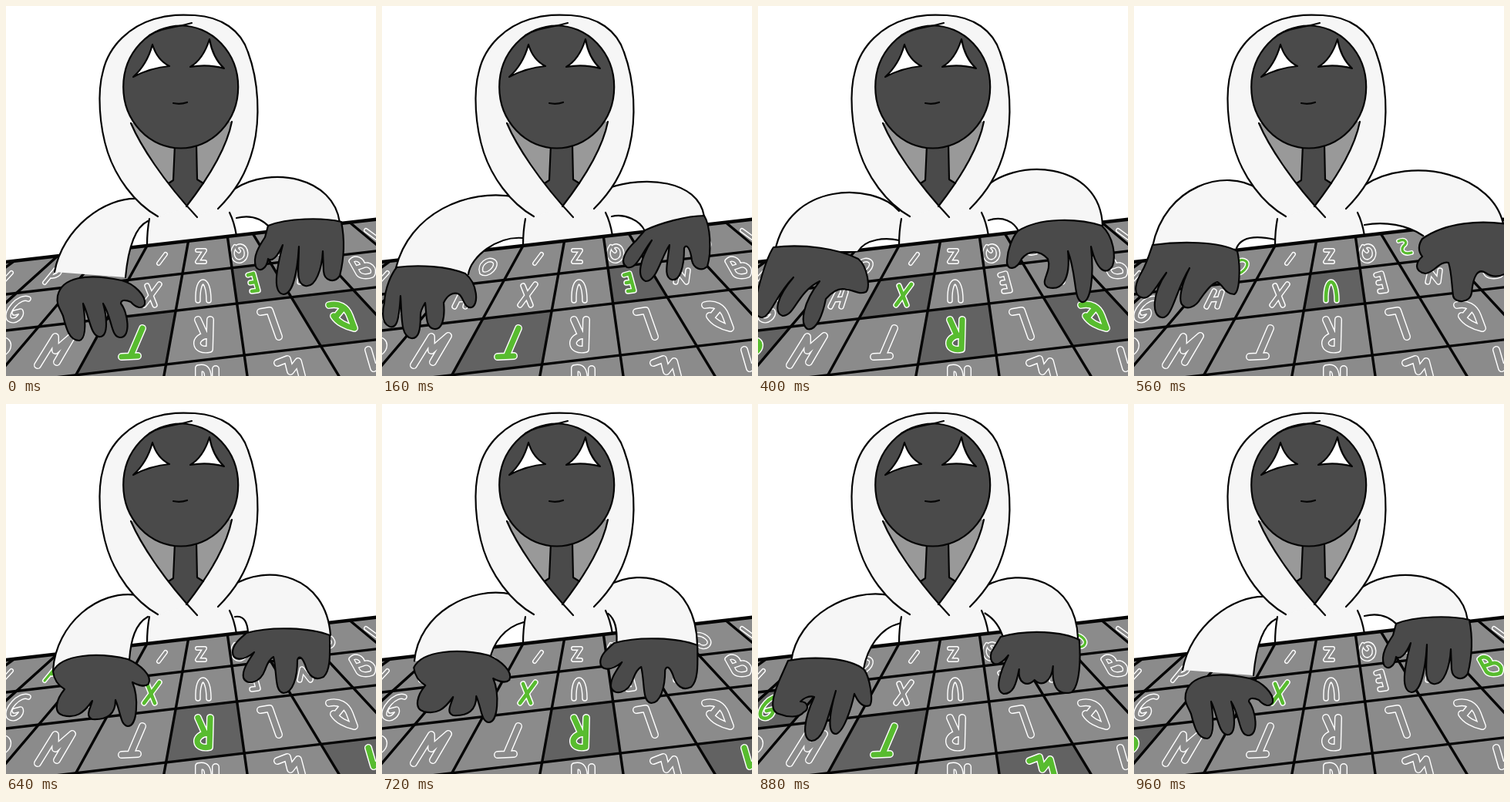
Write an HTML page that moves like this. It is 480 px wide and 480 px high and loops after 1040 ms.

```html
<!DOCTYPE html>
<html lang="en">
<head>
<meta charset="utf-8">
<title>Typing</title>
<style>
html, body { margin: 0; width: 100%; height: 100%; overflow: hidden; background: #fff; }
svg { display: block; width: 100vw; height: 100vh; }
path, ellipse { stroke-linecap: round; stroke-linejoin: round; }
.ink { fill: none; stroke: #050505; stroke-width: 2.2; }
.cloth { fill: #f6f6f6; }
.skin { fill: #4a4a4a; }
.line { stroke: #050505; stroke-width: 2.2; }
.cap { fill: #8b8b8b; }
.glyph { fill: none; stroke: #8b8b8b; }
.rim { fill: none; stroke: #fff; }
.down .cap { fill: #626262; }
.lit .glyph { stroke: #58bc2f; }
.grid { fill: none; stroke: #050505; stroke-width: 3.4; }
</style>
</head>
<body>
<svg viewBox="0 0 480 480">
  <path class="cloth" d="M172 250L186 275L180 316L300 304L296 238Z"/>
  <g id="board"></g>
  <g id="arms"></g>
  <path class="ink" d="M186 276Q183 292 183 310M290 268Q296 280 299 298"/>
  <g id="hood">
    <path class="cloth" d="M197 273C165 255 142 220 132 190C121 156 118 112 126 84C134 50 162 26 192 17C212 11 228 11 245 12C280 14 305 32 314 60C328 98 330 145 321 183C312 218 297 241 275 263L248 273L235 262Z"/>
    <path class="ink" d="M197 273C165 255 142 220 132 190C121 156 118 112 126 84C134 50 162 26 192 17C212 11 228 11 245 12C280 14 305 32 314 60C328 98 330 145 321 183C312 218 297 241 275 263"/>
    <path fill="#999" d="M162 152C173 177 197 217 235 259.500C262 224 286 186 293 150Z"/>
    <path class="skin" d="M219 180L217 226L211 230L235 259L256 230L248 225L247 180Z"/>
    <path class="ink" d="M219 180L217 226L211 230M247 180L248 225L256 230"/>
    <path class="ink" d="M162 152C174 180 203 226 248 274M293 150C286 186 262 224 234 260"/>
    <ellipse class="skin line" cx="226.700" cy="105" rx="74.500" ry="79.500"/>
    <path class="ink" d="M186 38C202 28 220 28 241 22"/>
    <path fill="#fff" class="line" d="M190 50Q183 76 165 92Q188 80 212 78Q196 70 190 50Z"/>
    <path fill="#fff" class="line" d="M264 43Q256 69 239 79Q262 75 283 81Q268 67 264 43Z"/>
    <path class="ink" d="M217 126Q226 128 235 125"/>
  </g>
  <g id="hands"></g>
</svg>
<script>
const STEP = 80, LOOP = 1040;
const $ = id => document.getElementById(id);

function add(parent, tag, attrs) {
  const el = document.createElementNS('http://www.w3.org/2000/svg', tag);
  for (const k in attrs) el.setAttribute(k, attrs[k]);
  return parent.appendChild(el);
}

// Rows: y = a - b * x. Columns: x = c + s * (y - 300).
const rows = [[332, .115], [374, .117], [421, .117], [489.5, .118], [570, .118]];
const cols = [[54, -1.4], [94, -1.11], [141, -.85], [189, -.55], [237.5, -.181],
  [287.4, .142], [323, .605], [387, .93], [469, 1.2], [545, 1.5]];

function cross(r, c) {
  const [a, b] = rows[r], [x, s] = cols[c];
  const y = (a - b * (x - 300 * s)) / (1 + b * s);
  return `${(x + s * (y - 300)).toFixed(1)} ${y.toFixed(1)}`;
}
const cell = (r, c) =>
  `M${cross(r, c)}L${cross(r, c + 1)}L${cross(r + 1, c + 1)}L${cross(r + 1, c)}Z`;

// name: [row, column, strokes]
const keys = {
  J: [0, 0, 'M-4 358L7 346'],
  P: [0, 1, 'M50 359L64 342C74 338 72 350 59 351'],
  O: [0, 2, 'M129 346C125 335 138 326 145 331C152 336 138 352 129 346'],
  I: [0, 3, 'M198 334L207 322'],
  Z: [0, 4, 'M248 317H258L248 332H258'],
  Q: [0, 5, 'M297 312C290 322 296 332 304 331C315 328 313 312 304 311C300 311 297 314 302 318'],
  S: [0, 6, 'M343 305C353 301 355 308 350 311C345 317 350 323 360 320'],
  C: [0, 7, 'M406 299C416 297 429 306 423 313C419 317 413 315 411 313'],
  I2: [0, 8, 'M467 291L482 302'],
  G: [1, 1, 'M29 380C18 375 -2 397 4 406C11 412 22 402 19 396L11 398'],
  H: [1, 2, 'M94 390L104 370M108 390L114 371M99 381L111 380'],
  X: [1, 3, 'M179 388L199 361M183 363L193 388'],
  U: [1, 4, 'M249 382C248 350 263 350 263 382'],
  E: [1, 5, 'M314 349L321 347L327 369L319 370M323 358L317 359'],
  N: [1, 6, 'M381 358L384 344L395 358L397 343'],
  B: [1, 7, 'M448 331C453 325 462 329 463 337C471 333 480 341 475 349C468 352 460 351 457 347L448 331M463 337L454 340'],
  D: [2, 1, 'M-5 434C5 434 4 445 -5 450'],
  M: [2, 2, 'M41 466L64 429L64 447L86 428L66 462'],
  T: [2, 3, 'M150 455L171 454M162 453L177 418'],
  R: [2, 4, 'M265 407L264 445C244 449 242 429 262 427M258 427L249 407'],
  L: [2, 5, 'M330 397L342 395L354 429'],
  A: [2, 6, 'M419 388C432 385 442 391 446 402L452 418C441 416 430 410 425 402M438 391L428 403'],
  N2: [3, 4, 'M250 484V470C260 468 262 474 262 484M272 484V471'],
  M2: [3, 5, 'M352 463L365 458L369 474L379 461L384 480'],
  V: [3, 6, 'M470 446L477 470L486 464']
};
const board = $('board'), caps = {};
add(board, 'path', { class: 'cap', d: 'M-5 332L485 276V485H-5Z' });
for (const name in keys) {
  const [r, c, d] = keys[name];
  const g = caps[name] = add(board, 'g', {});
  const w = [6, 7.5, 10, 10][r];
  add(g, 'path', { class: 'cap', d: cell(r, c) });
  add(g, 'path', { class: 'rim', d, 'stroke-width': w });
  add(g, 'path', { class: 'glyph', d, 'stroke-width': w - 2.8 });
}
rows.forEach(([a, b], i) => add(board, 'path',
  { class: 'grid', d: `M-5 ${a + 5 * b}L485 ${a - 485 * b}`, style: i ? '' : 'stroke-width:4.6' }));
cols.forEach((_, c) => add(board, 'path', { class: 'grid', d: `M${cross(0, c)}L${cross(4, c)}` }));

// Each pose: sleeve curves (shoulder to cuff, cuff to armpit) and hand
const left = [
  ['172 250 128 247 73 289 63 345', '155 352 158 320 165 288 184 279',
    'M67 376C72 352 105 346 150 356C166 360 182 376 180 387C176 394 168 391 162 384C153 380 149 382 149 386C158 397 163 430 148 430C136 430 138 405 126 386C130 400 134 428 122 429C110 430 108 402 100 386C102 400 106 432 95 434C82 434 78 418 74 402C70 392 65 388 67 376Z'],
  ['175 248 110 235 35 270 18 340', '112 348 115 325 150 298 183 301',
    'M19 339C50 335 85 338 108 347C124 360 126 388 116 391C106 392 106 378 100 374C92 370 84 376 80 385C82 405 78 420 68 419C56 418 58 400 56 385C52 392 50 395 50 400C50 420 48 432 38 431C24 428 26 405 24 376C22 412 18 418 10 416C0 412 0 398 3 385C4 365 12 348 19 339Z'],
  ['183 266 150 228 40 228 22 318', '130 318 140 302 165 300 183 304',
    'M20 313C60 308 105 315 130 328C142 338 146 365 140 371C130 375 124 368 115 368C105 365 95 372 88 380C84 400 76 422 64 419C54 412 58 385 80 357C50 372 48 402 32 402C20 398 24 378 46 352C22 376 16 405 4 404C-8 400 -6 390 0 368C6 345 12 325 20 313Z'],
  ['160 237 120 210 40 232 24 312', '133 314 140 297 165 299 183 303',
    'M24 310C60 305 110 305 134 318C138 335 138 370 130 374C118 374 116 362 108 358C100 360 92 372 86 380C80 391 68 394 64 389C56 384 62 360 72 340C54 368 50 406 36 404C22 402 24 372 42 346C26 368 20 382 10 378C-4 374 4 355 10 345C16 335 20 322 24 310Z'],
  ['170 248 120 240 65 285 61 345', '160 332 162 305 168 285 184 276',
    'M61 347C72 324 120 322 158 331C174 338 190 352 185 363C180 368 172 365 164 361C172 380 171 418 158 418C148 416 149 400 142 384C142 402 132 410 112 409C102 405 110 394 112 385C100 402 90 408 74 404C60 400 66 382 76 370C66 364 62 356 61 347Z'],
  ['167 246 110 230 30 258 23 322', '119 335 125 315 150 294 184 290',
    'M20 323C50 317 100 318 119 335C126 345 131 375 126 381C116 385 110 375 106 366C102 385 92 416 82 418C70 418 74 390 82 362C72 395 66 428 50 427C38 424 40 400 54 370C47 368 40 372 36 376C46 376 48 386 40 390C34 398 18 396 8 392C-6 388 2 365 8 350Z']
];
const right = [
  ['297 237 345 207 425 222 433 281', '342 287 330 274 315 271 299 275',
    'M340 285C365 275 410 274 435 280C440 305 438 330 433 350C426 360 413 357 412 344L411 318C410 340 402 366 388 363C375 360 380 340 380 312C378 345 372 374 360 374C346 372 350 345 359 310C352 326 345 332 340 328C338 342 328 346 324 338C320 325 328 312 336 300Z'],
  ['294 236 340 220 410 225 418 273', '341 292 335 278 315 269 298 273',
    'M341 291C360 282 395 272 418 272C426 285 428 318 422 338C414 345 404 340 402 330C400 314 395 308 392 314C392 340 386 357 376 355C365 352 370 335 373 310C362 326 356 358 342 357C330 352 334 330 350 304C336 322 330 342 318 339C306 332 318 315 329 305Z'],
  ['290 240 330 195 445 200 447 286', '338 292 332 280 318 272 299 278',
    'M337 292C365 274 415 275 446 285C462 300 464 325 460 337C452 350 440 345 432 312C436 350 432 386 420 384C409 380 414 350 402 318C406 355 394 370 376 365C364 358 382 345 376 328C364 315 350 318 342 328C336 342 322 345 323 330C324 315 330 300 337 292Z'],
  ['298 233 360 192 470 218 480 288', '375 298 355 284 325 279 299 284',
    'M374 302C405 280 450 278 484 283V346C474 352 464 352 456 346C446 340 440 350 438 372C436 386 416 386 414 376C412 360 412 345 408 333C397 330 388 347 378 347C362 344 366 332 374 325C368 318 369 309 374 302Z'],
  ['291 237 340 205 415 222 421 300', '314 296 313 285 310 274 297 276',
    'M312 297C345 288 395 290 420 300C420 320 422 345 412 354C400 360 392 352 388 338C384 328 380 326 378 332C378 355 372 375 360 375C348 373 352 350 347 328C340 332 338 340 336 345C330 362 312 366 308 355C306 345 314 334 322 322C306 335 294 332 294 322C294 312 304 304 312 297Z'],
  ['294 235 340 215 400 235 397 326', '295 322 297 300 296 285 290 268',
    'M294 322C330 312 375 315 396 326C398 350 397 385 386 394C370 398 360 390 362 360C360 380 348 388 338 378C328 388 316 382 318 364C314 385 310 396 298 396C286 392 292 370 304 346C288 366 278 356 282 342Z']
];

const mix = (a, b, u) => a.map((v, i) => v + (b[i] - v) * u);
const curve = p => `${p[0]} ${p[1]}C${p.slice(2).join(' ')}`;

// Sleeves glide from pose to pose; the hand rides on the cuff
function limb(data, hub) {
  const poses = data.map(([outer, inner, hand]) =>
    ({ arm: `${outer} ${inner}`.split(' ').map(Number), hand }));
  const fill = add($('arms'), 'path', { class: 'cloth' });
  const edge = add($('arms'), 'path', { class: 'ink' });
  const hand = add($('hands'), 'path', { class: 'skin line' });
  const cuff = p => [(p[6] + p[8]) / 2, (p[7] + p[9]) / 2];
  return (a, b, u) => {
    const from = poses[a], to = poses[b], near = u > .5 ? to : from;
    const arm = mix(from.arm, to.arm, u);
    const outer = curve(arm.slice(0, 8)), inner = curve(arm.slice(8));
    fill.setAttribute('d', `M${outer}L${inner}L${hub}Z`);
    edge.setAttribute('d', `M${outer}M${inner}`);
    const [x, y] = cuff(arm), [hx, hy] = cuff(near.arm);
    hand.setAttribute('d', near.hand);
    hand.setAttribute('transform', `translate(${x - hx} ${y - hy})`);
  };
}
const limbs = [limb(left, '190 265'), limb(right, '284 250')];

// Time, pose, pressed keys, released keys still glowing
const beats = [
  [0, 0, 'T E A', ''], [160, 1, 'T E', ''], [400, 2, 'X R A D', ''],
  [560, 3, 'U', 'O S'], [640, 4, 'R V', 'X P'], [800, 5, 'T M2 G', 'C'],
  [960, 0, 'D', 'X B'], [LOOP, 0, 'T E A', '']
];

let shown = -1;
function draw(now) {
  const t = Math.floor(now % LOOP / STEP) * STEP;
  if (t === shown) return;
  shown = t;
  const i = beats.findIndex(b => b[0] > t), a = beats[i - 1], b = beats[i];
  const u = (t - a[0]) / (b[0] - a[0]);
  limbs.forEach(pose => pose(a[1], b[1], u));
  const [down, glow] = (u > .5 ? b : a).slice(2).map(s => s.split(' '));
  for (const name in caps) {
    const held = down.includes(name);
    caps[name].classList.toggle('down', held);
    caps[name].classList.toggle('lit', held || glow.includes(name));
  }
}
const start = performance.now();
function tick() {
  draw(performance.now() - start);
  requestAnimationFrame(tick);
}
tick();
</script>
</body>
</html>
```
